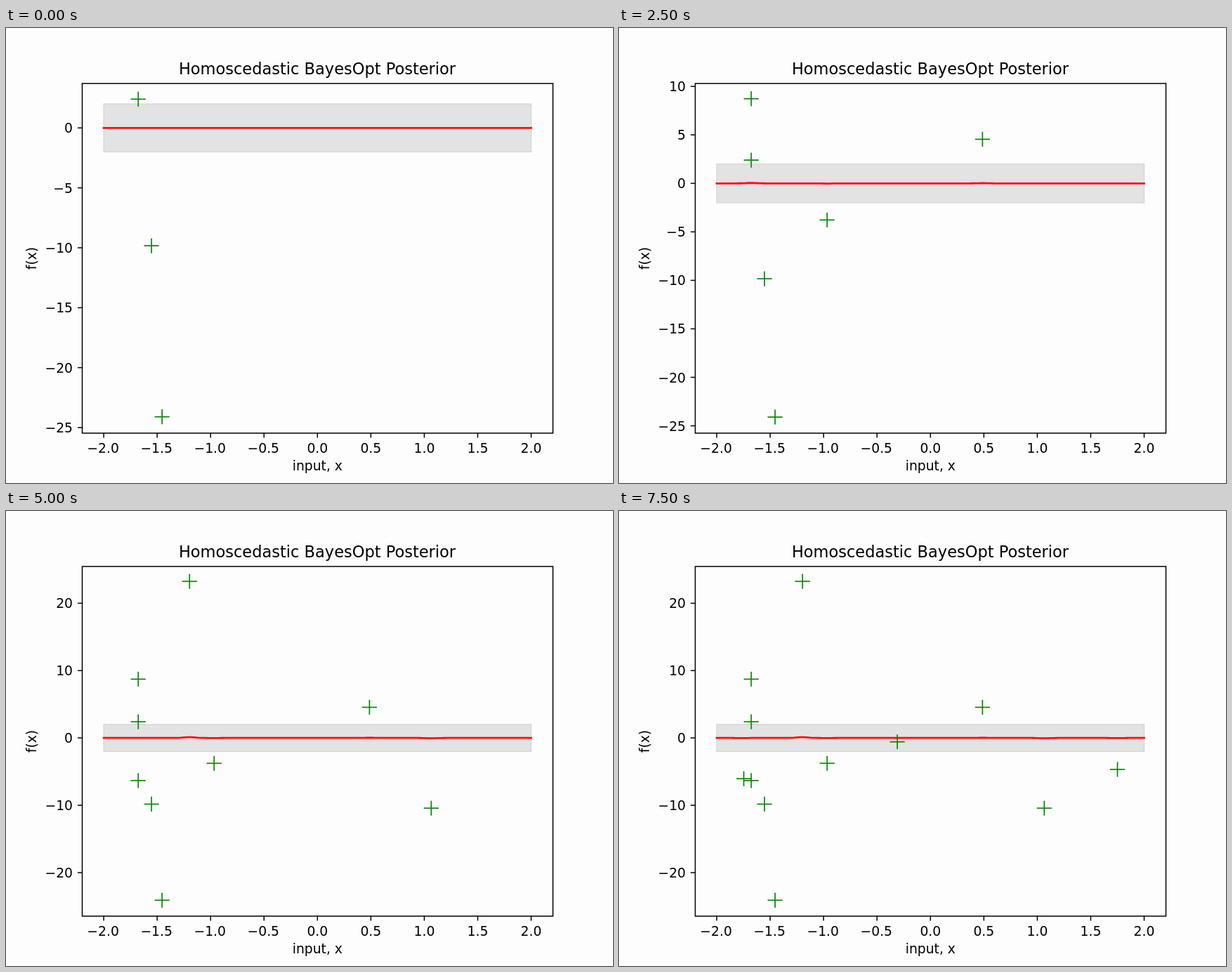
Recreate the animation shown at these times as an HTML page with a canvas. Size 864 by 648 pixels, loop 8.33 s.

```html
<!DOCTYPE html>
<html lang="en">
<head>
<meta charset="utf-8">
<title>Posterior plot</title>
<style>
  html, body { margin: 0; width: 100%; height: 100%; overflow: hidden; background: #fdfdfd; }
  canvas { display: block; }
</style>
</head>
<body>
<canvas id="stage" width="864" height="648"></canvas>
<script>
const ctx = document.getElementById('stage').getContext('2d');
const LOOP = 8330;
const STEPS = [0, 830, 1670, 2500, 3330, 4170, 5000, 5830, 6670, 7500];
const INITIAL = 3;
const FONT = '"DejaVu Sans", sans-serif';
const BOX = { left: 108.5, top: 79, right: 778.5, bottom: 577 };

// Samples in order of appearance: input, value
const SAMPLES = [
  [-1.677, 2.4], [-1.553, -9.83], [-1.454, -24.1],
  [-1.677, 8.73], [-0.967, -3.77], [0.487, 4.55], [-1.677, -6.33],
  [1.065, -10.43], [-1.197, 23.25], [1.75, -4.68], [-0.31, -0.58], [-1.747, -6.05]
];

// Vertical axis ranges, each valid from a given step
const SCALES = [
  { from: 0, zero: 142.3, unit: 17.07, ticks: [0, -5, -10, -15, -20, -25] },
  { from: 1, zero: 221.3, unit: 13.81, ticks: [10, 5, 0, -5, -10, -15, -20, -25] },
  { from: 6, zero: 323.2, unit: 9.59, ticks: [20, 10, 0, -10, -20] }
];

const px = x => 443.3 + x * 152.1;
const label = (value, digits) => value.toFixed(digits).replace('-', '\u2212');

function text(str, x, y, align = 'center', size = 18.75) {
  ctx.font = `${size}px ${FONT}`;
  ctx.textAlign = align;
  ctx.fillText(str, x, y);
}

function line(x1, y1, x2, y2) {
  ctx.beginPath();
  ctx.moveTo(x1, y1);
  ctx.lineTo(x2, y2);
  ctx.stroke();
}

function stroke(color, width) {
  ctx.strokeStyle = color;
  ctx.lineWidth = width;
}

function drawPosterior(py, fitted) {
  const mean = x => fitted.reduce(
    (sum, [sx, sy]) => sum + 0.005 * sy * Math.exp(-((x - sx) ** 2) / 0.005), 0);

  ctx.fillStyle = '#e3e3e3';
  stroke('#d4d4d4', 1.3);
  const top = py(2), height = py(-2) - top;
  ctx.fillRect(px(-2), top, px(2) - px(-2), height);
  ctx.strokeRect(px(-2), top, px(2) - px(-2), height);

  stroke('#ff0d0d', 2.8);
  ctx.lineCap = 'square';
  ctx.beginPath();
  for (let x = -2; x <= 2.001; x += 0.02) ctx.lineTo(px(x), py(mean(x)));
  ctx.stroke();
  ctx.lineCap = 'butt';
}

function drawSamples(py, samples) {
  stroke('#0b830b', 1.7);
  for (const [x, y] of samples) {
    const cx = px(x), cy = py(y), r = 10.6;
    line(cx - r, cy, cx + r, cy);
    line(cx, cy - r, cx, cy + r);
  }
}

function drawAxes(py, ticks) {
  ctx.fillStyle = '#000';
  stroke('#000', 1.5);
  ctx.strokeRect(BOX.left, BOX.top, BOX.right - BOX.left, BOX.bottom - BOX.top);
  for (let x = -2; x <= 2; x += 0.5) {
    line(px(x), BOX.bottom, px(x), BOX.bottom + 6.5);
    text(label(x, 1), px(x) - (x < 0 ? 1 : 0), 605);
  }
  for (const y of ticks) {
    line(BOX.left - 6.5, py(y), BOX.left, py(y));
    text(label(y, 0), 95, py(y) + 7, 'right');
  }
  text('input, x', 443.3, 630);
  text('Homoscedastic BayesOpt Posterior', 443, 66, 'center', 22.5);
  ctx.save();
  ctx.translate(43, 328);
  ctx.rotate(-Math.PI / 2);
  text('f(x)', 0, 0);
  ctx.restore();
}

function draw(step) {
  const scale = SCALES.filter(s => s.from <= step).pop();
  const py = y => scale.zero - y * scale.unit;
  const samples = SAMPLES.slice(0, INITIAL + step);
  ctx.fillStyle = '#fdfdfd';
  ctx.fillRect(0, 0, 864, 648);
  drawPosterior(py, samples.slice(INITIAL));
  drawSamples(py, samples);
  drawAxes(py, scale.ticks);
}

const start = performance.now();
let shown = -1;
function tick() {
  const time = (performance.now() - start) % LOOP;
  const step = STEPS.filter(t => t <= time).length - 1;
  if (step !== shown) draw(shown = step);
  requestAnimationFrame(tick);
}
tick();
</script>
</body>
</html>
```
